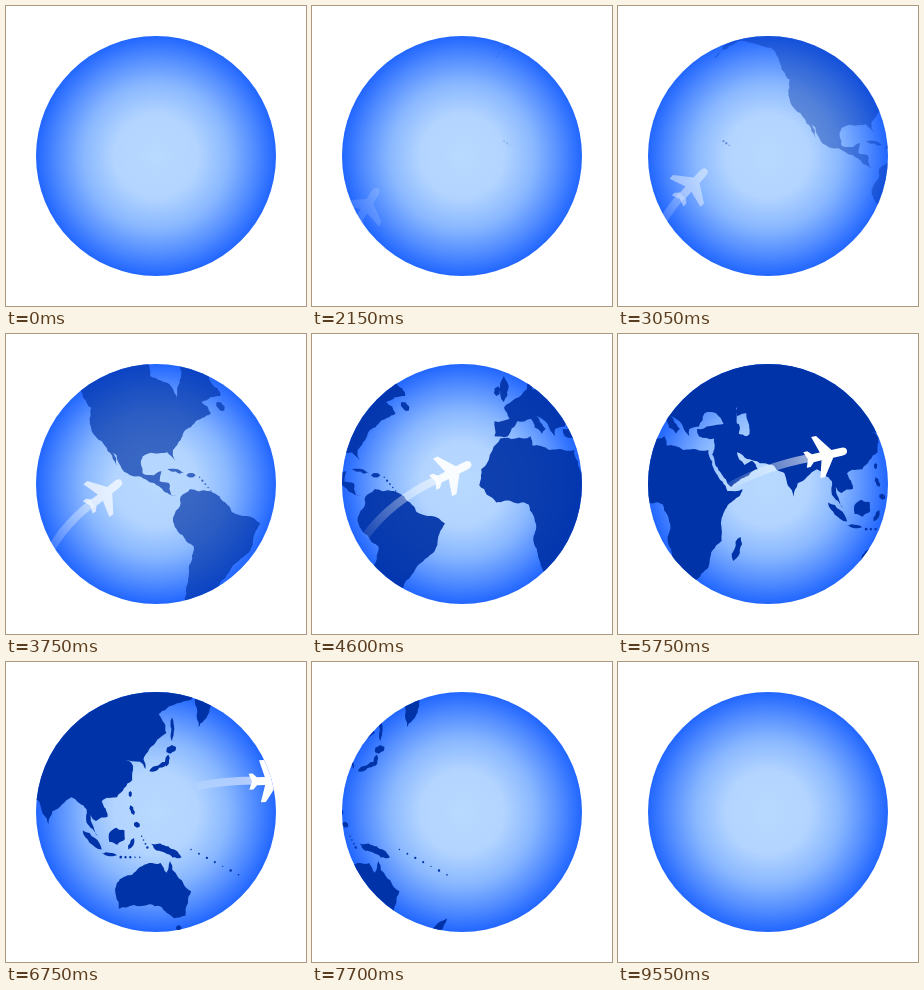
Recreate the animation shown at these times as an HTML page with a canvas. Size 300 px wide and 300 px high, loop 10 s.

```html
<!DOCTYPE html>
<html lang="en">
<head>
<meta charset="utf-8">
<title>Plane around the globe</title>
<style>
html, body { margin: 0; height: 100%; overflow: hidden; background: #fff; }
canvas { display: block; }
</style>
</head>
<body>
<canvas id="stage" width="300" height="300"></canvas>
<script>
const ctx = document.getElementById('stage').getContext('2d');
const LOOP = 10000, STEP = 50, SCALE = 1.9, EQUATOR = 178;

// Capes and bays as "longitude latitude", clockwise; the coast between them is roughened.
const continents = {
  northAmerica: '-170 66,-94 66,-93 58,-82 55,-79 51,-78 62,-65 60,-56 52,-66 50,-61 46,-70 42,-76 37,-81 31,-80 26,-84 30,-97 28,-97 20,-91 19,-87 21,-88 16,-83 15,-82 9,-78 8,-86 11,-94 16,-105 20,-113 31,-110 23,-117 33,-124 40,-124 48,-134 58,-150 60,-164 55,-158 59,-165 62',
  southAmerica: '-77 8,-72 12,-62 11,-50 0,-35 -6,-39 -17,-48 -26,-57 -37,-65 -42,-66 -50,-75 -50,-70 -18,-81 -5,-78 2',
  africa: '-6 36,10 37,11 33,20 31,33 31,37 20,43 11,51 12,40 -3,40 -15,35 -20,33 -28,26 -34,19 -34,12 -17,13 -8,9 4,-8 5,-17 14,-16 22,-10 31',
  europe: '-9 37,-9 43,-1 44,-4 48,8 54,9 57,11 54,21 55,24 59,30 60,22 60,24 65,17 61,15 56,11 59,6 58,8 66,48 66,48 42,41 42,37 46,31 46,28 41,23 40,23 37,19 42,13 45,18 40,16 38,10 44,3 43,-2 37',
  middleEast: '27 40,41 42,49 42,49 38,53 37,60 39,70 39,70 24,57 26,48 30,52 24,56 26,59 22,45 13,35 29,36 36,28 37',
  asia: '40 66,180 66,163 60,162 55,157 51,155 60,136 55,140 49,128 39,129 35,126 38,118 39,122 37,122 30,114 22,106 20,109 12,103 10,100 13,104 2,98 9,98 16,90 22,80 15,78 8,73 20,66 25,54 37,53 46,48 45',
  australia: '114 -22,122 -18,131 -12,137 -12,140 -17,142 -11,146 -19,153 -26,150 -37,144 -38,137 -33,131 -32,115 -34'
};

// Long islands: two ends and a width in pixels
const islands = {
  britain: ['-4 50,-4 58', 7],
  ireland: ['-8 52,-7 55', 6],
  cuba: ['-84 22,-75 20', 3],
  hispaniola: ['-74 19,-69 19', 4],
  newfoundland: ['-58 50,-54 47', 6],
  madagascar: ['46 -25,50 -13', 7],
  sumatra: ['96 5,106 -5', 6],
  java: ['106 -7,114 -8', 3],
  borneo: ['110 -1,118 5', 14],
  sulawesi: ['120 -5,123 1', 4],
  newGuinea: ['132 -2,148 -9', 8],
  luzon: ['121 18,123 13', 4],
  mindanao: ['123 9,126 7', 5],
  taiwan: ['121 25,121 22', 3],
  honshu: ['131 34,141 38', 5],
  tohoku: ['140 36,141 41', 4],
  hokkaido: ['140 42,145 44', 7],
  sakhalin: ['143 46,143 54', 3],
  tasmania: ['145 -42,148 -42', 5],
  newZealand: ['168 -46,178 -38', 5]
};

// Rows of specks: two ends and a count
const chains = {
  antilles: ['-67 18,-61 11', 5],
  hawaii: ['-156 20,-159 22', 3],
  sunda: ['116 -9,126 -9', 5],
  moluccas: ['127 2,130 -4', 4],
  melanesia: ['153 -5,178 -18', 7]
};

let seed = 7;
const random = () => (seed = seed * 16807 % 2147483647) / 2147483647;

const project = text => text.split(',').map(pair => {
  const [lon, lat] = pair.split(' ').map(Number);
  const north = Math.log(Math.tan(Math.PI / 4 + lat * Math.PI / 360));
  return [lon * SCALE, EQUATOR - north * 180 / Math.PI * SCALE];
});
const mix = (a, b, p) => a.map((v, i) => v + (b[i] - v) * p);
const land = new Path2D();

// Midpoint displacement from a to b
function coastTo(a, b) {
  const [dx, dy] = [b[0] - a[0], b[1] - a[1]];
  const length = Math.hypot(dx, dy);
  if (length < 4) return land.lineTo(...b);
  const shift = (random() - .5) * Math.min(.25, 4 / length);
  const [x, y] = mix(a, b, .5);
  const mid = [x - dy * shift, y + dx * shift];
  coastTo(a, mid);
  coastTo(mid, b);
}

function addLand(points) {
  land.moveTo(...points[0]);
  points.forEach((p, i) => coastTo(p, points[(i + 1) % points.length]));
  land.closePath();
}

function addIsland([ends, width]) {
  const [a, b] = project(ends);
  const turn = Math.atan2(b[1] - a[1], b[0] - a[0]) + Math.PI / 2;
  const side = (p, sign) => {
    const [x, y] = mix(a, b, p), r = sign * width / 2;
    return [x + r * Math.cos(turn), y + r * Math.sin(turn)];
  };
  addLand([a, side(.25, -1), side(.75, -1), b, side(.75, 1), side(.25, 1)]);
}

function addChain([ends, count]) {
  const [a, b] = project(ends);
  for (let i = 0; i < count; i++) {
    const [x, y] = mix(a, b, i / (count - 1));
    const r = .6 + random() * .8;
    land.moveTo(x + r, y);
    land.arc(x, y, r, 0, 7);
  }
}

for (const outline of Object.values(continents)) addLand(project(outline));
Object.values(islands).forEach(addIsland);
Object.values(chains).forEach(addChain);

const plane = new Path2D('M22 0Q22-4 16-4L7-4L-5-21L-10-21L-5-4L-13-4L-17-8L-21-8L-18 0L-21 8L-17 8L-13 4L-5 4L-10 21L-5 21L7 4L16 4Q22 4 22 0Z');
const globe = new Path2D();
globe.arc(150, 150, 120, 0, 7);

const ocean = ctx.createRadialGradient(150, 150, 0, 150, 150, 120);
ocean.addColorStop(0, '#b8daff');
ocean.addColorStop(.35, '#b2d4ff');
ocean.addColorStop(.6, '#8ab8ff');
ocean.addColorStop(.8, '#5891ff');
ocean.addColorStop(1, '#2166ff');

// cubic-bezier(.42, 0, .58, 1)
function easeInOut(p) {
  if (p <= 0) return 0;
  if (p >= 1) return 1;
  let lo = 0, hi = 1, s;
  for (let i = 0; i < 24; i++) {
    s = (lo + hi) / 2;
    const x = 1.26 * s * (1 - s) ** 2 + 1.74 * s * s * (1 - s) + s ** 3;
    if (x < p) lo = s; else hi = s;
  }
  return s * s * (3 - 2 * s);
}

// Flight path: part of an ellipse, measured from its left end
const CX = 250, CY = 270.5, RX = 220, RY = 152, DEG = Math.PI / 180;
const onPath = a => [CX - RX * Math.cos(a), CY - RY * Math.sin(a)];

function drawFlight(travel) {
  const angle = (18 + 97 * travel) * DEG;
  const length = Math.max(5, 33 - 113 * (travel - .43) ** 2) * DEG;
  const start = angle - length, end = angle - 4.5 * DEG;
  const trail = ctx.createLinearGradient(...onPath(start), ...onPath(end));
  trail.addColorStop(0, 'rgba(255,255,255,.1)');
  trail.addColorStop(1, 'rgba(255,255,255,.6)');
  ctx.strokeStyle = trail;
  ctx.lineWidth = 8;
  ctx.beginPath();
  ctx.ellipse(CX, CY, RX, RY, 0, Math.PI + start, Math.PI + end);
  ctx.stroke();

  ctx.translate(...onPath(angle));
  ctx.rotate(Math.atan2(-RY * Math.cos(angle), RX * Math.sin(angle)) - 5 * DEG);
  ctx.fillStyle = '#fff';
  ctx.fill(plane);
}

function draw(t) {
  const travel = easeInOut(t / LOOP);
  const centre = -224.9 + 461 * travel;
  ctx.clearRect(0, 0, 300, 300);
  ctx.save();
  ctx.fillStyle = ocean;
  ctx.fill(globe);
  ctx.clip(globe);
  ctx.globalAlpha = easeInOut((t - 1000) / 4500);

  ctx.save();
  ctx.translate(150 - centre * SCALE, 0);
  ctx.fillStyle = '#0033a8';
  ctx.fill(land);
  ctx.restore();

  drawFlight(travel);
  ctx.restore();
}

function tick() {
  const t = performance.now() % LOOP;
  draw(Math.floor(t / STEP) * STEP);
  requestAnimationFrame(tick);
}
tick();
</script>
</body>
</html>
```
